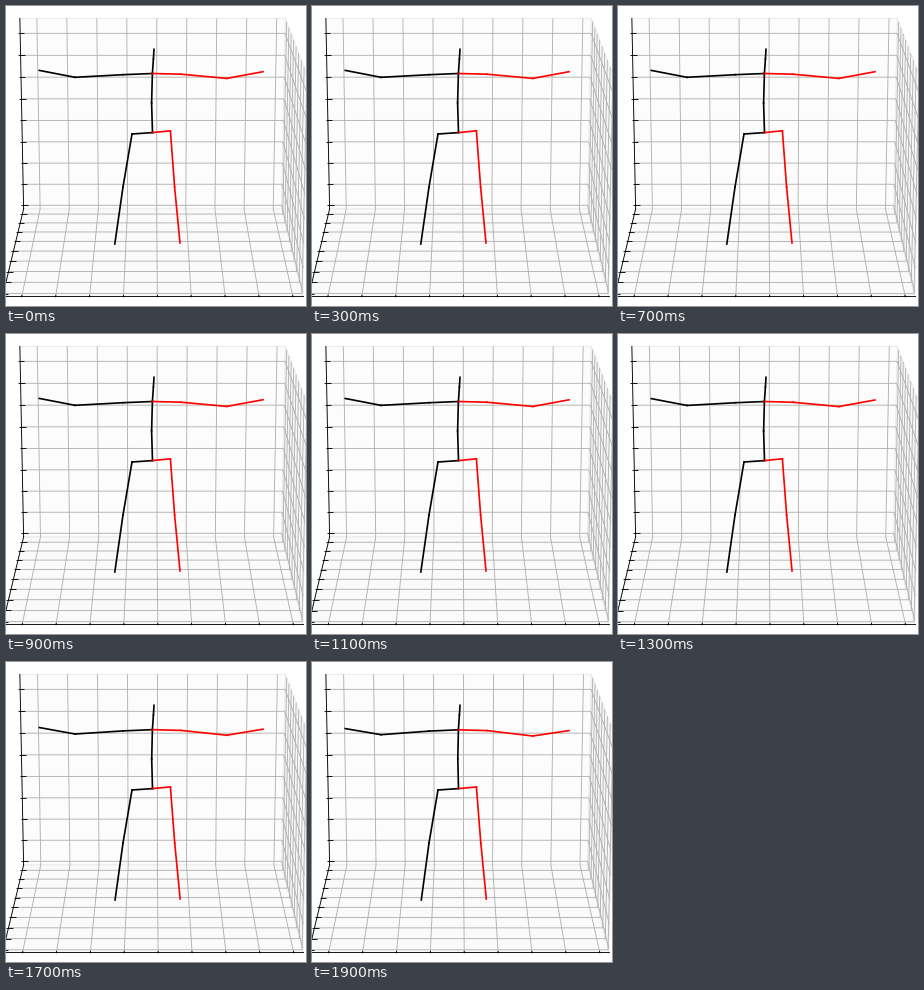
Write a matplotlib script that moves like this. It is 300x300 px and loops after 2000 ms.

```python
import numpy as np
import matplotlib.pyplot as plt
from matplotlib.animation import FuncAnimation
from matplotlib.collections import LineCollection
from matplotlib.patches import Polygon

SIZE, DPI, FRAMES = 300, 80, 20
ELEV = np.radians(15)
DIST, FOCAL = 7.5, 1775
CX, CY = 146.6, 142.9
HW, HH = 0.5952, 0.4464            # half width and half height of the box
STEP = 0.2 / 1.7 * 1.1429          # tick spacing, horizontally
Z_TICKS = (np.arange(9) * 0.2 / 1.7 - 0.5) * 0.8572
TICK_IN, TICK_OUT = 0.019, 0.0095


def project(x, y, z):
    """Box point (right, away, up) to stage pixels."""
    depth = DIST + y * np.cos(ELEV) - z * np.sin(ELEV)
    up = z * np.cos(ELEV) + y * np.sin(ELEV)
    return CX + FOCAL * x / depth, CY - FOCAL * up / depth


def path(*points):
    return [project(*p) for p in points]


def x_ticks(t):
    return (np.arange(9) - 3.86 + 0.026 * t) * STEP


def y_ticks(t):
    return (np.arange(9) - 4.17 - 0.03 * t) * STEP


def grid_lines(t):
    lines = [path((x, HW, HH), (x, HW, -HH), (x, -HW, -HH)) for x in x_ticks(t)]
    lines += [path((-HW, y, -HH), (HW, y, -HH), (HW, y, HH)) for y in y_ticks(t)]
    lines += [path((-HW, HW, z), (HW, HW, z), (HW, -HW, z)) for z in Z_TICKS]
    return lines


def tick_lines(t):
    left, right = -HW - TICK_OUT, -HW + TICK_IN
    lines = [path((x, -HW - TICK_OUT, -HH), (x, -HW + TICK_IN, -HH))
             for x in x_ticks(t)]
    lines += [path((left, y, -HH), (right, y, -HH)) for y in y_ticks(t)]
    lines += [path((left, HW, z), (right, HW, z)) for z in Z_TICKS]
    return lines


# joint: (x, y, final dx, final dy)
JOINTS = {
    "head": (148, 43.3, 0, 0), "nose": (147.4, 53, 0, 0),
    "neck": (146.4, 67.5, 0, 0.3), "spine": (145.6, 97, 0.2, 0),
    "root": (146.5, 126.6, 0, 0),
    "r_shoulder": (117, 68.7, 0, 0.4), "r_elbow": (69, 71.3, 0, 1.4),
    "r_hand": (33.3, 64.4, 0, 2.2),
    "l_shoulder": (175, 68.2, 0, 0.4), "l_elbow": (220.8, 72.4, 0, 1.6),
    "l_hand": (257, 65.7, 0, 2.9),
    "r_hip": (126, 128, 0, 0), "r_knee": (117, 181, 0, 0),
    "r_foot": (108.8, 238, 0.5, 0),
    "l_hip": (164.4, 124.8, 0, 0.2), "l_knee": (168.6, 181, 0.2, 0),
    "l_foot": (174, 237, 0.3, 0),
}
CHAINS = [
    ("head nose neck spine root", "black"),
    ("neck r_shoulder r_elbow r_hand", "black"),
    ("root r_hip r_knee r_foot", "black"),
    ("neck l_shoulder l_elbow l_hand", "red"),
    ("root l_hip l_knee l_foot", "red"),
]
BONES = [(a, b, color) for chain, color in CHAINS
         for a, b in zip(chain.split(), chain.split()[1:])]


def joint(name, ease):
    x, y, dx, dy = JOINTS[name]
    return x + dx * ease, y + dy * ease


fig = plt.figure(figsize=(SIZE / DPI, SIZE / DPI), dpi=DPI, facecolor="white")
ax = fig.add_axes([0, 0, 1, 1])
ax.set_xlim(0, SIZE)
ax.set_ylim(SIZE, 0)
ax.axis("off")

PANES = [
    ([(-HW, HW, -HH), (HW, HW, -HH), (HW, HW, HH), (-HW, HW, HH)], "#fcfcfc"),
    ([(HW, HW, -HH), (HW, -HW, -HH), (HW, -HW, HH), (HW, HW, HH)], "#f7f7f7"),
    ([(-HW, HW, -HH), (HW, HW, -HH), (HW, -HW, -HH), (-HW, -HW, -HH)], "#fafafa"),
]
for corners, color in PANES:
    ax.add_patch(Polygon(path(*corners), facecolor=color, edgecolor="#ececec",
                         linewidth=0.9, zorder=1))

grid = ax.add_collection(LineCollection([], colors="#b0b0b0", linewidths=0.8, zorder=2))
edge = path((-HW, HW, HH), (-HW, HW, -HH), (-HW, -HW, -HH), (HW, -HW, -HH))
for a, b in zip(edge, edge[1:]):
    ax.plot(*zip(a, b), color="black", linewidth=0.8, zorder=3)
ticks = ax.add_collection(LineCollection([], colors="black", linewidths=0.8, zorder=3))
bones = [ax.plot([], [], color=color, linewidth=1.5, zorder=4)[0]
         for _, _, color in BONES]


def update(i):
    t = i / (FRAMES - 1)
    grid.set_segments(grid_lines(t))
    ticks.set_segments(tick_lines(t))
    for line, (a, b, _) in zip(bones, BONES):
        line.set_data(*zip(joint(a, t ** 6), joint(b, t ** 6)))
    return [grid, ticks, *bones]


anim = FuncAnimation(fig, update, frames=FRAMES, interval=100, repeat=True)
plt.show()
```
